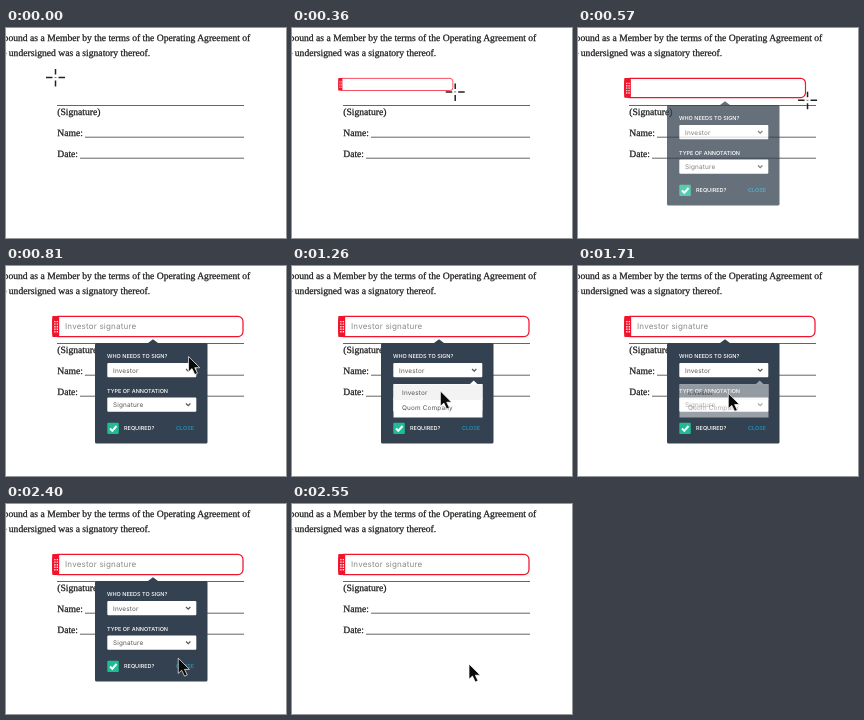
Animation, 280 px wide and 210 px high, one loop 2610 ms. Source, as an HTML page:

```html
<!DOCTYPE html>
<html lang="en">
<head>
<meta charset="utf-8">
<title>Signature field</title>
<style>
  html, body { margin: 0; width: 100%; height: 100%; overflow: hidden; background: #fff; }
  svg { display: block; width: 100%; height: 100%; }
  text { text-rendering: geometricPrecision; }
  .doc { font: 9.65px "Liberation Serif", "Times New Roman", serif; fill: #1c1c1c; stroke: #1c1c1c; stroke-width: .25px; }
  .rule { stroke: #4a4a4a; stroke-width: .85; }
  .ui { font-family: Inter, "Open Sans", sans-serif; }
  .hint { font-size: 8px; letter-spacing: .2px; fill: #8a8a8a; }
  .label { font-size: 5.5px; font-weight: 500; fill: #fff; }
  .value { font-size: 6.4px; letter-spacing: .17px; fill: #555; }
  .chevron { fill: none; stroke: #555; stroke-width: 1.2; }
</style>
</head>
<body>
<svg viewBox="0 0 280 210">
  <g class="doc">
    <text x="244.3" y="12.8" text-anchor="end">bound as a Member by the terms of the Operating Agreement of</text>
    <text x="144.2" y="27.8" text-anchor="end">the undersigned was a signatory thereof.</text>
    <text x="51.2" y="87">(Signature)</text>
    <text x="51.2" y="107.8">Name:</text>
    <text x="51.2" y="128.8">Date:</text>
  </g>
  <path class="rule" d="M51 77.5H238M79 109.2H238M74 130.2H238"/>

  <g id="field">
    <rect id="frame" fill="#fff" stroke="#f0142c"/>
    <g id="tab">
      <path d="M1 0H7V21H1Q0 21 0 20V1Q0 0 1 0Z" fill="#f0142c"/>
      <path d="M2.7 5V17M5.1 5V17" stroke="#fff" stroke-width="1.2" stroke-dasharray="1.4 1.15"/>
    </g>
  </g>
  <text id="hint" class="ui hint" x="59" y="63.3">Investor signature</text>

  <g id="popup" class="ui">
    <path d="M90.500 77H142L147 73.300L152 77H200Q201.500 77 201.500 78.500V176Q201.500 177.500 200 177.500H90.500Q89 177.500 89 176V78.500Q89 77 90.500 77Z" fill="#344150"/>
    <text class="label" x="101" y="92.2">WHO NEEDS TO SIGN?</text>
    <text class="label" x="101" y="126.6">TYPE OF ANNOTATION</text>
    <rect x="101.3" y="97" width="89" height="14.3" rx="1" fill="#fff"/>
    <rect x="101.3" y="131.5" width="89" height="14.3" rx="1" fill="#fff"/>
    <text class="value" x="107" y="106.5">Investor</text>
    <text class="value" x="107" y="141.100">Signature</text>
    <path class="chevron" d="M180 103l2.200 2.200l2.200-2.200M180 137.500l2.200 2.200l2.200-2.200"/>
    <rect x="101.3" y="156.7" width="11.500" height="11.300" rx="1" fill="#1fbc94"/>
    <path d="M104 162.500l2.300 2.300l4.200-4.800" fill="none" stroke="#fff" stroke-width="2"/>
    <text class="label" x="118" y="164.3">REQUIRED?</text>
    <text class="label" x="170" y="164.3" style="fill:#1a97c4">CLOSE</text>
  </g>

  <g id="menu" class="ui">
    <path d="M102 118H178L181.700 114.500L185.400 118H190.500V151.500H101.500V118Z" fill="#fff"/>
    <rect x="101.500" y="118.500" width="89" height="15.500" fill="#f3f3f3"/>
    <text class="value" x="110" y="128.500">Investor</text>
    <text class="value" x="110" y="144.300">Quom Company</text>
  </g>

  <g id="cross" fill="none">
    <path d="M-9.500 0H-3M3 0H9.500M0-8.500V-3M0 3V9" stroke="#222" stroke-width="1.500"/>
    <path d="M-1 0H1" stroke="#777" stroke-width="1"/>
  </g>
  <path id="arrow" d="M0 0V15.200L3.500 12.100L6.300 18L9 16.800L6.300 11.200H11.200Z" fill="#0a0a0a" stroke="#fff" stroke-width=".7"/>
</svg>
<script>
  const LOOP = 2610, STEP = 30;
  const FIELD = { x: 46.7, y: 50.4, width: 190.3, height: 20.2 };
  const tracks = {
    cross: [[0, 49.5, 49.5], [600, 239, 73.5]],
    arrow: [[660, 239.4, 73], [900, 148.4, 101], [1050, 148.4, 101], [1260, 148.4, 125], [1650, 148.4, 125], [2550, 177, 160]],
    draw: [[0, 0], [600, 1]],
    hint: [[600, 0], [660, 1]],
    popup: [[480, 0], [600, 1], [2430, 1], [2550, 0]],
    menu: [[840, 0], [900, 1], [1650, 1], [1770, 0]]
  };
  const el = id => document.getElementById(id);

  // Linear interpolation through [time, ...values] keys, held at both ends.
  function at(name, t) {
    const keys = tracks[name];
    const next = keys.findIndex(key => key[0] > t);
    if (next === 0) return keys[0].slice(1);
    if (next < 0) return keys[keys.length - 1].slice(1);
    const a = keys[next - 1], b = keys[next];
    const p = (t - a[0]) / (b[0] - a[0]);
    return a.slice(1).map((v, i) => v + (b[i + 1] - v) * p);
  }

  function drawField(p) {
    el('field').style.display = p > 0 ? '' : 'none';
    const shape = {
      x: FIELD.x, y: FIELD.y, width: FIELD.width * p, height: FIELD.height * p,
      rx: 5 * p, 'stroke-width': 1.25 * p
    };
    for (const key in shape) el('frame').setAttribute(key, shape[key]);
    el('tab').setAttribute('transform', `translate(${FIELD.x - .5} ${FIELD.y - .5}) scale(${p})`);
  }

  function render(t) {
    drawField(at('draw', t)[0]);
    for (const id of ['hint', 'popup', 'menu']) el(id).style.opacity = at(id, t)[0];
    for (const id of ['cross', 'arrow']) el(id).setAttribute('transform', `translate(${at(id, t)})`);
    el('cross').style.display = t < 660 ? '' : 'none';
    el('arrow').style.display = t < 660 ? 'none' : '';
  }

  const start = performance.now();
  function tick() {
    const t = (performance.now() - start) % LOOP;
    render(Math.floor(t / STEP) * STEP);
    requestAnimationFrame(tick);
  }
  tick();
</script>
</body>
</html>
```
